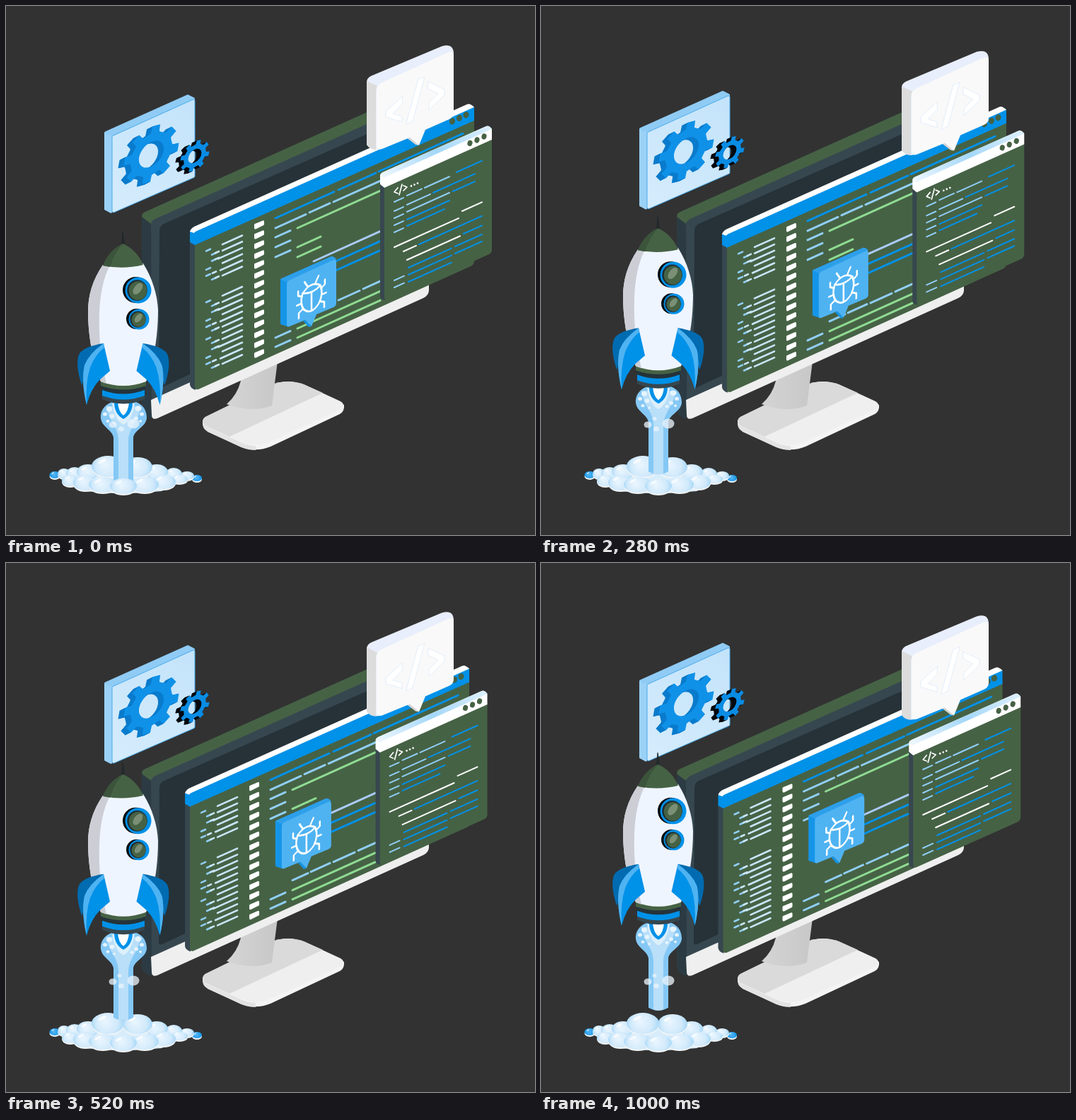
These frames come from a looping animation (748 px wide and 748 px high, 1.02 s). An HTML page with a canvas:

```html
<!DOCTYPE html>
<html lang="en">
<head>
<meta charset="utf-8">
<title>Launch</title>
<style>
html, body { margin: 0; width: 100%; height: 100%; overflow: hidden; background: #323232; }
canvas { display: block; width: 748px; height: 748px; }
</style>
</head>
<body>
<canvas id="stage" width="748" height="748"></canvas>
<script>
const ctx = document.getElementById('stage').getContext('2d');
const LOOP = 1020, STEP = 20, SLOPE = -0.45;
const C = {
  green: '#466245', slate: '#37474f', ink: '#263238', blue: '#0091e8', deep: '#006bb0',
  sky: '#4fb3f2', light: '#90cef6', pale: '#c9e6fb', lav: '#a9cbfa', lime: '#8fdb92', white: '#fff'
};

function paint(d, fill, stroke, w = 1) {
  const p = new Path2D(d);
  if (fill) { ctx.fillStyle = fill; ctx.fill(p); }
  if (stroke) { ctx.strokeStyle = stroke; ctx.lineWidth = w; ctx.stroke(p); }
}

// polygon from a flat point list, with optional corner radius
function poly(pts, fill, r = 0, stroke) {
  const n = pts.length;
  ctx.beginPath();
  ctx.moveTo((pts[0] + pts[n - 2]) / 2, (pts[1] + pts[n - 1]) / 2);
  for (let i = 0; i < n; i += 2) {
    const j = (i + 2) % n;
    ctx.arcTo(pts[i], pts[i + 1], pts[j], pts[j + 1], r);
  }
  ctx.closePath();
  ctx.fillStyle = fill;
  ctx.fill();
  if (stroke) { ctx.strokeStyle = stroke; ctx.lineWidth = 1; ctx.stroke(); }
}

function oval(x, y, rx, ry, fill, rot = 0) {
  ctx.beginPath();
  ctx.ellipse(x, y, rx, ry, rot, 0, Math.PI * 2);
  ctx.fillStyle = fill;
  ctx.fill();
}

function blend(x0, y0, x1, y1, ...colors) {
  const g = ctx.createLinearGradient(x0, y0, x1, y1);
  colors.forEach((c, i) => g.addColorStop(i / (colors.length - 1), c));
  return g;
}

function dash(x, y, x2, color, w = 2.6) {
  ctx.strokeStyle = color;
  ctx.lineWidth = w;
  ctx.beginPath();
  ctx.moveTo(x, y);
  ctx.lineTo(x2, y + (x2 - x) * SLOPE);
  ctx.stroke();
}

function at(dx, dy, draw) {
  ctx.save();
  ctx.translate(dx, dy);
  draw();
  ctx.restore();
}

function monitor() {
  // stand
  paint('M278 586Q277 592 285 602L333 624Q355 631 374 623L472 577Q479 573 478 564L400 545Z', '#f4f4f4');
  paint('M282 581L372 537Q395 526 421 535L473 559Q482 565 472 571L370 618Q355 624 337 618L283 594Q274 587 282 581Z', '#efefef');
  paint('M282 581L372 537Q395 526 421 535L448 547L316 609L283 594Q274 587 282 581Z', '#dadada');
  paint('M278 587Q279 592 284 595L337 619Q345 622 353 622V628Q342 628 333 624L284 601Q277 597 278 587Z', '#e3e3e3');
  paint('M332 527L384 502L376 565Q347 576 312 563Q327 550 332 530Z', blend(315, 0, 380, 0, '#d4d4d4', '#c8c8c8'));
  // case
  paint('M192 297Q192 293 197 291L560 128L597 135V170L206 304V584Q192 580 192 570Z', '#2c3b43');
  paint('M192 298Q192 293 197 291L560 128L597 132V136L212 301Q206 304 205 308Z', C.green);
  paint('M205 310Q205 304 211 301L597 128V384L206 558Z', C.slate);
  paint('M217 318Q217 311 223 308L590 146V366L221 539Q216 541 216 535Z', C.ink);
  paint('M205 557L598 380V402Q598 409 590 413L214 583Q206 586 206 578Z', '#efefef');
}

function fileList() {
  for (let i = 0; i < 18; i++) {
    const y = i < 6 ? 324.5 + i * 8.8 : 397 + (i - 6) * 8.75;
    const x = [306, 306, 300, 306, 303, 306][i % 6];
    dash(x, y + (334 - x) * 0.45, 334, C.pale);
    const ind = [0, 1, 1, 0, 0, 1][i % 6] * 8;
    dash(283 + ind, y + 22 - ind * 0.45, 289 + ind, C.light);
    if (i % 3 != 0) dash(292 + ind / 2, y + 18 - ind / 4, 297 + ind / 2, C.pale);
  }
  for (let i = 0; i < 14; i++) {
    const y = 309.5 + i * 14;
    poly([351, y - 1, 365, y - 7, 365, y, 351, y + 7], C.white, 1.5);
  }
}

function mainWindow() {
  paint('M260 330L268 334V543Q260 540 260 535Z', C.slate);
  paint('M267 334L662 158V360Q662 366 657 368L272 542Q267 543 267 538Z', C.green);
  paint('M260 320Q261 316 266 314L653 140Q656 138 662 143V162L267 338L260 334Z', C.blue);
  paint('M260 319Q261 315 266 312L652 139Q656 137 662 143L270 318Q267 319 266 321Z', C.white);
  [[631, 163], [641, 158.5], [650.5, 154]].forEach(d => oval(...d, 4, 4.6, C.green, 0.3));
  fileList();
  [
    [381, 300, 464, C.blue], [470, 260, 523, C.blue], [527, 234, 646, C.blue],
    [381, 314, 424, C.light], [429, 292, 458, C.light], [463, 277, 529, C.light],
    [412, 314, 529, C.lime], [412, 341, 445, C.lime], [412, 355, 445, C.lime],
    [435, 361, 529, C.lav], [435, 375, 529, C.blue], [435, 388, 529, C.blue],
    [412, 442, 434, C.light], [438, 430, 465, C.light], [470, 416, 500, C.light],
    [505, 400, 529, C.light], [412, 456, 529, C.lime], [412, 469, 529, C.lime]
  ].forEach(d => dash(...d, 3));
  [327, 341, 355, 469, 482].forEach(y => dash(381, y, 402, C.light, 3));
}

function smallWindow() {
  paint('M529 248L536 254V416Q529 415 529 410Z', C.slate);
  paint('M535 254L687 186V344Q687 350 681 352L540 415Q535 417 535 411Z', C.green);
  paint('M529 240Q529 237 533 235L679 170Q683 169 687 174V189L535 257L529 252Z', C.white);
  paint('M529 239Q530 236 533 235L679 170Q683 168 687 174L540 240Q536 242 535 243Z',
    blend(530, 236, 687, 170, '#eef7ff', '#a4d7f8', '#dff0fd'));
  [[656, 194], [666, 189.5], [676, 184.5]].forEach(d => oval(...d, 3.5, 4.1, C.green, 0.3));
  paint('M554 257L549 263L554 265M560 252L556 267M562 254L567 256L562 261', null, C.white, 1.7);
  [573, 577.5, 582].forEach((x, i) => oval(x, 254.5 - i * 1.9, 1.3, 1.4, C.white));
  [277, 290, 300, 310, 320].forEach(y => dash(549, y, 562, C.light, 2));
  [388, 398].forEach(y => dash(549, y, 563, C.light, 2));
  [
    [567, 268, 588, C.light], [592, 257, 627, C.light], [637, 235, 673, C.blue],
    [567, 281, 600, C.light], [604, 264, 663, C.blue],
    [567, 291, 627, C.light], [632, 262, 663, C.blue],
    [567, 302, 627, C.blue], [567, 311, 620, C.blue],
    [549, 341, 640, C.white], [645, 290, 673, C.white],
    [562, 347, 580, C.white], [584, 337, 673, C.blue],
    [567, 359, 642, C.white], [647, 322, 673, C.blue],
    [569, 370, 630, C.blue], [635, 340, 673, C.blue],
    [569, 380, 630, C.blue], [635, 350, 673, C.blue],
    [569, 390, 630, C.blue]
  ].forEach(d => dash(...d, 2));
}

function codeBubble() {
  paint('M510 108Q510 102 516 99L616 57Q633 52 633 68V80L526 130V203Q515 204 510 196Z', '#e8eefb');
  paint('M510 106L525 113Q523 117 523 121V203Q514 203 510 196Z', '#dcdcdc');
  paint('M566 186L579 196L583 197L579 180Z', '#d5d5d5');
  paint('M524 119Q524 112 530 109L624 66Q633 62 633 71V151Q633 157 627 160L593 175L584 197L571 186L532 202Q524 205 524 197Z', '#f9f9f9');
  [
    'M560 128L537 149V157L560 164V156L547 152L560 139Z',
    'M583 104L592 100L575 163L566 167Z',
    'M597 107L620 118V126L598 147V137L611 124L597 117Z'
  ].forEach(d => paint(d, C.white, '#dceafa', 0.8));
}

function bugBubble() {
  poly([388, 386, 460, 354, 467, 358, 400, 390, 400, 454, 388, 450], '#1595e8', 2);
  paint('M388 386L460 354Q464 354 467 358L398 391Z', '#2d9fea');
  paint('M397 394Q397 390 400 388L463 359Q467 357 467 362V420Q467 424 463 426L439 436L432 453L423 444L401 453Q397 455 397 450Z', C.sky);
  paint('M423 444L432 453L428 454L420 445Z', '#1595e8');
  ctx.save();
  ctx.transform(0.9, -0.4, 0, 0.92, 432, 408);
  paint('M-14 -8Q0 -22 14 -8Q19 6 12 18Q0 32 -12 18Q-19 6 -14 -8ZM-14 -8Q0 0 14 -8M0 -4V24', null, C.white, 2.8);
  for (const s of [-1, 1]) {
    ctx.save();
    ctx.scale(s, 1);
    paint('M6 -15L11 -24M15 -3L21 -7V-14M16 7H23M13 16L20 20V28', null, C.white, 2.8);
    ctx.restore();
  }
  ctx.restore();
}

function gear(x, y, r, dx, dy, face, back, turn) {
  const p = new Path2D();
  for (let i = 0; i < 8; i++) {
    const a = turn + i * Math.PI / 4;
    [[-0.29, 0.75], [-0.2, 0.77], [-0.145, 1], [0.145, 1], [0.2, 0.77], [0.29, 0.75]].forEach(([o, k], j) => {
      const px = Math.cos(a + o) * r * k, py = Math.sin(a + o) * r * k;
      i + j ? p.lineTo(px, py) : p.moveTo(px, py);
    });
  }
  p.closePath();
  p.moveTo(r * 0.45, 0);
  p.arc(0, 0, r * 0.45, 0, Math.PI * 2);
  const steps = Math.ceil(Math.abs(dx));
  for (let i = steps; i >= 0; i--) {
    ctx.save();
    ctx.transform(0.93, -0.42, 0, 0.92, x + dx * i / steps, y + dy * i / steps);
    ctx.fillStyle = i ? back : face;
    ctx.fill(p, 'evenodd');
    ctx.restore();
  }
}

function gearCard() {
  poly([139, 178, 257, 125, 267, 130, 267, 160, 152, 200, 150, 294, 139, 288], '#8fcbf4', 2);
  poly([139, 179, 150, 184, 150, 293, 139, 288], '#9bd1f6', 1);
  poly([150, 184, 267, 131, 267, 242, 150, 293], blend(150, 290, 267, 130, '#d5ecfc', '#c3e3fa'), 2, '#49abee');
  gear(205.5, 209.5, 42, -8, 4, '#0f91e8', '#0a7bcc', -0.6);
  gear(267, 212, 22.5, -7, 3, '#0a8ce4', '#02080e', -0.5);
}

function puff(x, y, rx, ry, edge = '#a9d9f8') {
  oval(x, y + 2, rx, ry, '#f1f4f6');
  const g = ctx.createRadialGradient(x - rx * 0.2, y - ry * 0.2, 1, x, y, rx);
  g.addColorStop(0, edge == C.blue ? C.sky : '#e9f5fe');
  g.addColorStop(0.65, edge == C.blue ? '#2c9feb' : '#d2eafb');
  g.addColorStop(1, edge);
  oval(x, y, rx, ry, g);
  oval(x - rx * 0.35, y - ry * 0.5, rx * 0.27, ry * 0.16, '#ffffffbb', -0.5);
}

function smokeBack() {
  paint('M78 664L110 686L166 690L220 686L258 668L190 652H140Z', '#d8edfb');
  puff(69, 663, 7.5, 5, C.blue);
  puff(270, 667.5, 7, 4.5, C.blue);
  puff(82, 661, 9, 7, C.light);
  puff(256, 664, 10, 6, C.light);
  puff(97, 661, 12, 9);
  puff(237, 662, 12, 9);
  puff(116, 659, 16, 11);
  puff(213, 659, 16, 11);
  puff(144, 651, 23, 15);
  puff(186, 652, 21, 14);
}

function smokeFront() {
  puff(91, 671, 12, 8);
  puff(245, 669, 12, 6);
  puff(112, 674, 17, 11);
  puff(223, 673, 17, 10);
  puff(137, 677, 20, 11);
  puff(196, 677, 20, 11);
  puff(166, 679, 19, 11);
}

function jet() {
  paint('M150 560C138 564 133 574 134 583C136 596 150 599 152 610V680Q166 688 180 680V610C182 599 197 596 199 583C199 573 195 564 184 560Z', '#85c8f5');
  paint('M142 566C146 590 159 595 159 614V683Q166 685 173 683V614C174 595 188 588 190 566Z', '#b9dff9');
  paint('M150 562Q154 586 166 592Q178 586 182 562Z', '#dceffc');
  [
    [140, 577, 3], [146, 570, 4], [144, 587, 2.5], [150, 580, 3.5], [153, 590, 2],
    [192, 577, 3], [187, 569, 4.5], [184, 583, 3], [190, 587, 2], [178, 588, 2.5]
  ].forEach(([x, y, r]) => oval(x, y, r, r * 0.85, '#e6f4fe'));
}

function sparks() {
  [[151, 592, 5.5, 4.6], [160.5, 583.5, 3, 2.5], [163, 598, 4, 3.5], [180, 590.5, 8.5, 7]]
    .forEach(d => oval(...d, '#e9f3fbc4'));
}

function fin() {
  paint('M138 477Q112 481 104 491Q97 505 107 536L119 505Z', C.deep);
  paint('M138 477Q117 492 111 508Q106 531 114 564Q120 541 133 528L147 516Z', C.blue);
  paint('M138 477Q117 492 111 508Q106 531 114 564Q112 532 119 511Q126 493 139 483Z', C.sky);
}

function porthole(x, y, r) {
  oval(x - 2.5, y - 0.5, r, r, '#05090c');
  oval(x + 1, y, r, r, C.blue);
  oval(x - 0.5, y, r * 0.77, r * 0.8, '#1f2c33');
  oval(x + 0.5, y + 0.5, r * 0.69, r * 0.72, C.green);
  oval(x + r * 0.02, y - r * 0.12, r * 0.28, r * 0.5, '#7b8f76', 0.65);
}

function rocket() {
  paint('M153 560Q153 577 166 584Q179 577 179 560Z', C.blue);
  paint('M158 560Q159 574 166 579Q173 574 174 560Z', C.white);
  paint('M136 546H196V556Q166 569 136 556Z', C.slate);
  paint('M135 532H197V548Q166 559 135 548Z', '#25333a');
  paint('M136 543Q166 554 196 543V551Q166 562 136 551Z', C.blue);
  paint('M134 530H198V537Q166 548 134 537Z', C.green);
  const side = 'M137 366C122 388 116 410 116 432C116 470 124 505 134 531';
  paint(side + 'Q166 543 198 531C208 505 215 470 215 430C214 408 207 385 194 364Z', '#eff5ff');
  paint(side + 'L142 534C134 500 131 470 132 435C133 405 138 385 147 366Z', '#cdced5');
  paint('M165 320L163.5 340H167.5Z', '#20282b', '#20282b', 1);
  paint('M165.5 336Q146 345 137 367Q165 373 194 366Q185 345 165.5 336Z', C.green);
  paint('M165.5 336Q146 345 137 367L147 369Q153 349 165.5 336Z', '#3b543b');
  porthole(186, 402, 18.5);
  porthole(187, 443, 14.5);
  fin();
  ctx.save();
  ctx.translate(331.5, 0);
  ctx.scale(-1, 1);
  fin();
  ctx.restore();
}

let start;
function frame(now) {
  start ??= now;
  const t = Math.floor(((now - start) % LOOP) / STEP) * STEP;
  const p = Math.sin(Math.PI / 2 * t / 1000);
  const lift = -51.2 * p;
  ctx.fillStyle = '#323232';
  ctx.fillRect(0, 0, 748, 748);
  ctx.lineCap = ctx.lineJoin = 'round';
  monitor();
  at(-9.5 * p, 9 * p, mainWindow);
  at(-8.8 * p, 15 * p, smallWindow);
  at(0, 18.4 * p, codeBubble);
  at(-9.8 * p, -29 * p, bugBubble);
  at(0, -12.2 * p, gearCard);
  smokeBack();
  at(0, lift, jet);
  sparks();
  smokeFront();
  at(0, lift, rocket);
  requestAnimationFrame(frame);
}
requestAnimationFrame(frame);
</script>
</body>
</html>
```
